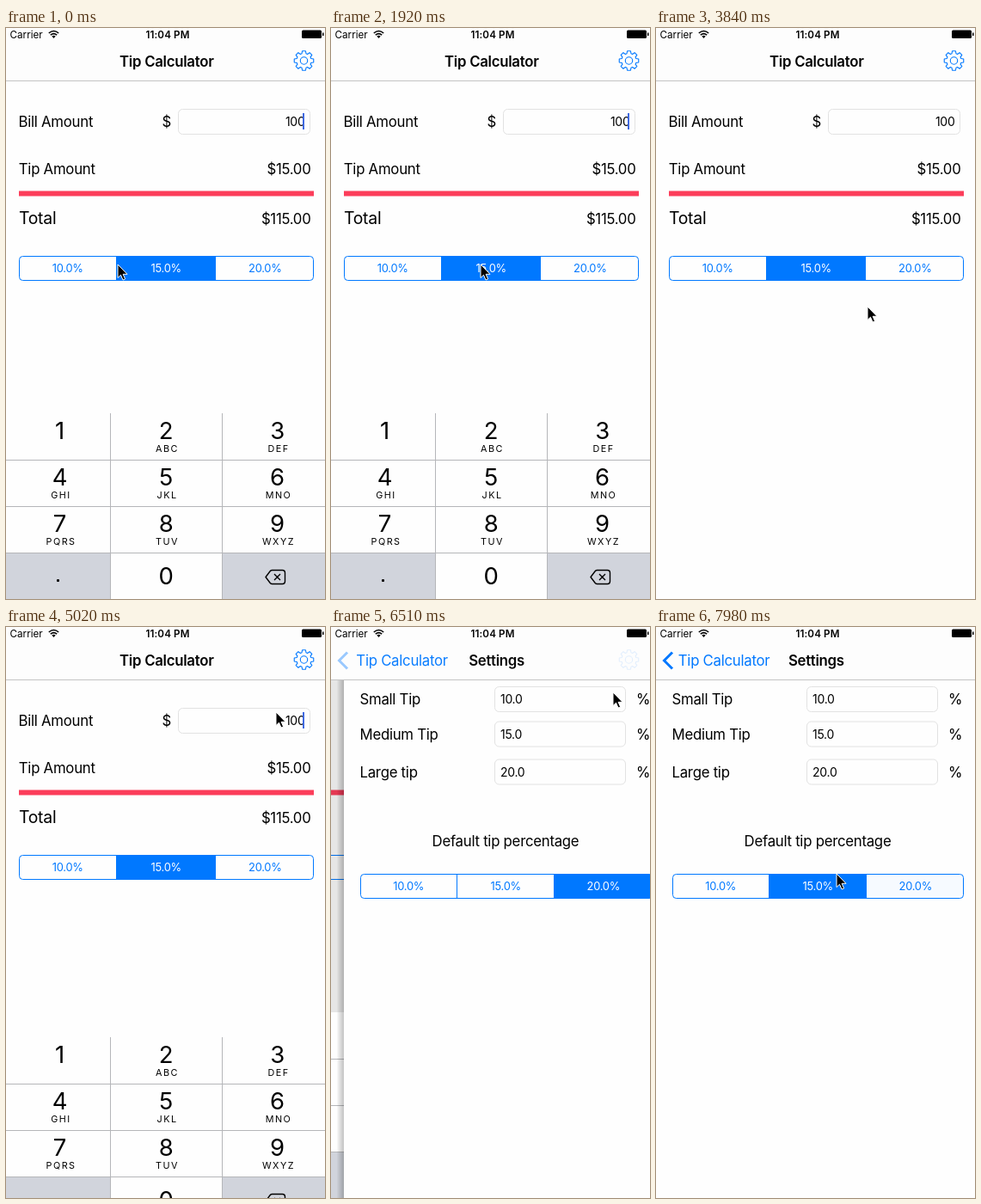
These frames come from a looping animation (371 by 664 pixels, 8000 ms). An HTML page:

```html
<!DOCTYPE html>
<html lang="en">
<head>
<meta charset="utf-8">
<title>Tip Calculator</title>
<style>
html, body { margin: 0; width: 100%; height: 100%; overflow: hidden; background: #fefefe; }
svg { display: block; width: 371px; height: 664px; font: 16.8px Inter, sans-serif; letter-spacing: -.016em; }
</style>
</head>
<body>
<svg id="stage" viewBox="0 0 371 664"></svg>
<script>
const BLUE = '#0078ff', STEP = 147.8, LOOP = 8000, LAST = 54;
const stage = document.getElementById('stage');

// Tracks: [step, value...]
const pointer = [[0, 130, 275], [4, 82, 282], [8, 86, 287], [13, 174, 275], [16, 215, 356], [18, 215, 356],
  [26, 246, 324], [32, 312, 104], [34, 314, 99], [39, 345, 38], [41, 346, 36], [42, 346, 36],
  [44, 328, 76], [50, 210, 287]];
const keyboardDrop = [[19, 0], [20, 60], [21, 165], [22, 216], [32, 216], [33, 120], [34, 29], [35, 2], [36, 0]];
const pushLeft = [[42, 1], [43, .4], [44, .0404], [45, 0]];

function at(track, n) {
  if (n <= track[0][0]) return track[0].slice(1);
  const i = track.findIndex(k => k[0] >= n);
  if (i < 0) return track[track.length - 1].slice(1);
  const a = track[i - 1], b = track[i], p = (n - a[0]) / (b[0] - a[0]);
  return a.slice(1).map((v, j) => v + (b[j + 1] - v) * p);
}

const text = (s, x, y, attrs = '') => `<text x="${x}" y="${y}" ${attrs}>${s}</text>`;
const rect = (x, y, w, h, fill, attrs = '') =>
  `<rect x="${x}" y="${y}" width="${w}" height="${h}" fill="${fill}" ${attrs}/>`;
const group = (x, y, body, attrs = '') => `<g transform="translate(${x} ${y})" ${attrs}>${body}</g>`;
const line = (d, color, width, attrs = '') =>
  `<path d="${d}" fill="none" stroke="${color}" stroke-width="${width}" ${attrs}/>`;
const field = (x, y, w, h) => rect(x + .5, y + .5, w - 1, h - 1, '#fefefe', 'rx="5" stroke="#e2e2e2"');
const MID = 'text-anchor="middle"', END = 'text-anchor="end"';

// edges: the four vertical borders; tint: optional [cell, colour]
function segments(edges, y, selected, tint) {
  const [l, a, b, r] = edges, h = 29;
  const cell = (i, fill) => {
    const x = edges[i], X = edges[i + 1], p = i == 0 ? 4 : 0, q = i == 2 ? 4 : 0;
    return `<path fill="${fill}" d="M${x + p} ${y}H${X - q}q${q} 0 ${q} ${q}V${y + h - q}q0 ${q} ${-q} ${q}` +
      `H${x + p}q${-p} 0 ${-p} ${-p}V${y + p}q0 ${-p} ${p} ${-p}z"/>`;
  };
  return (tint ? cell(...tint) : '') + cell(selected, BLUE) +
    rect(l + .5, y + .5, r - l - 1, h - 1, 'none', `rx="4" stroke="${BLUE}"`) +
    line(`M${a + .5} ${y}v${h}M${b - .5} ${y}v${h}`, BLUE, 1) +
    ['10.0%', '15.0%', '20.0%'].map((s, i) => text(s, (edges[i] + edges[i + 1]) / 2 + .3, y + 19,
      `${MID} font-size="12.9" fill="${i == selected ? '#fff' : BLUE}"`)).join('');
}

function calculator(n, caret) {
  const low = n >= 5 && n < 13;
  const tint = n == 4 ? [0, '#d5e9ff'] : n == 12 ? [1, '#d5e9ff'] : null;
  return rect(0, 62, 371, 602, '#fefefe') +
    text('Bill Amount', 14.5, 115) + text('$', 181.5, 115) + field(200, 94, 154, 30) +
    text('100', 347.5, 114, END + ' font-size="14"') +
    (caret ? rect(345, 99, 2, 19, '#3f68e0') : '') +
    text('Tip Amount', 14.8, 170) + text(low ? '$10.00' : '$15.00', 354.5, 170, END) +
    rect(15, 189.5, 343, 6, '#fc3d5a') +
    text('Total', 15, 227.5, 'font-size="19.4"') + text(low ? '$110.00' : '$115.00', 354.5, 227.5, END) +
    segments([15, 128, 244, 358], 265, low ? 0 : 1, tint);
}

const letters = ['', 'ABC', 'DEF', 'GHI', 'JKL', 'MNO', 'PQRS', 'TUV', 'WXYZ'];
const keyboard = rect(0, 0, 371, 216, '#fefefe') +
  rect(0, 163, 121, 53, '#d1d4dc') + rect(252, 163, 119, 53, '#d1d4dc') +
  line('M0 54.5H371M0 108.5H371M0 162.5H371M121.5 0V216M251.5 0V216', '#b5b6b9', 1) +
  letters.map((s, i) => {
    const x = [62.5, 186, 315.5][i % 3], y = 30 + 54 * (i / 3 | 0);
    return text(i + 1, x, y, MID + ' font-size="27.5"') +
      text(s, x + 1.5, y + 15, MID + ' font-size="10.8" letter-spacing="1.5"');
  }).join('') +
  text('0', 186, 199, MID + ' font-size="27.5"') + rect(59, 193, 3, 3, '#000', 'rx="1"') +
  line('M309.5 182.5H321.5q3 0 3 3V195.5q0 3 -3 3H309.5q-1.3 0 -2.2 -1L302 190.5L307.3 183.5q.9 -1 2.2 -1z' +
    'M312 187l7 7M319 187l-7 7', '#000', 1.4, 'stroke-linejoin="round"');

function settings(n) {
  const rows = [['Small Tip', '10.0', 69], ['Medium Tip', '15.0', 109.5], ['Large tip', '20.0', 153.5]];
  const tint = n == 53 ? [1, '#d5e9ff'] : n == 54 ? [2, '#f6faff'] : null;
  return rect(0, 62, 371, 602, '#fefefe') +
    rows.map(([name, value, y]) => text(name, 18.5, y + 21) + field(175, y, 153, 30) +
      text(value, 182, y + 20, 'font-size="14"') + text('%', 340, y + 21)).join('') +
    text('Default tip percentage', 188, 254.5, MID) +
    segments([19, 131, 245, 358], 287, n < 54 ? 2 : 1, tint);
}

const status = text('Carrier', 4.5, 11.5, 'font-size="11.7" letter-spacing="0"') +
  text('11:04 PM', 188, 11.5, MID + ' font-size="11.6" font-weight="600" letter-spacing=".15"') +
  line('M49.8 6q5.7 -5 11.4 0M51.8 8.2q3.7 -3.2 7.4 0', '#000', 1.6) +
  '<path d="M53.3 9.6q2.2 -1.7 4.4 0L55.5 12z"/>' +
  rect(344, 2.5, 23, 9.5, '#000', 'rx="1.5"') + rect(368, 5.5, 1.5, 3.5, '#000');

function gearPath() {
  const pts = [];
  for (let i = 0; i < 8; i++)
    for (const [da, r] of [[-.29, 8.6], [-.17, 11.4], [.17, 11.4], [.29, 8.6]]) {
      const a = i * Math.PI / 4 + da;
      pts.push((r * Math.cos(a)).toFixed(2) + ' ' + (r * Math.sin(a)).toFixed(2));
    }
  return 'M' + pts.join('L') + 'z';
}
const gear = line(gearPath(), BLUE, 1.1, 'stroke-linejoin="round"') +
  `<circle r="4.2" fill="none" stroke="${BLUE}" stroke-width="1.1"/>`;

function header(n, left) {
  const gearAlpha = n < 40 ? 1 : n < 43 ? .2 : left ? .1 : 0;
  const fade = a => `opacity="${Math.max(0, a)}"`;
  return rect(0, 0, 371, 61, '#fdfdfd') + rect(0, 61, 371, 1, '#c4c4c4') + status +
    text('Tip Calculator', 186.8 - 105 * (1 - left), 45, `${MID} font-weight="600" ${fade(left < .1 ? 0 : left)}`) +
    (left < 1 ? text('Settings', 186.3 + 155 * left, 45, `${MID} font-weight="600" ${fade(1 - left)}`) +
      text('Tip Calculator', 25.8 + 87 * left, 45, `fill="${BLUE}" ${fade(1 - left)}`) +
      line('M19 29.5L9.5 39L19 48.5', BLUE, 3, fade(1 - 15 * left)) : '') +
    group(346.5, 38, gear, fade(gearAlpha));
}

const arrow = '<path d="M0 0V15.5L3.5 12.2L6 18L8.6 16.9L6.1 11.3H11z" stroke="#fff" stroke-width="1"/>';

function scene(n) {
  const [left] = at(pushLeft, n), [drop] = at(keyboardDrop, n), [x, y] = at(pointer, n);
  const blink = n * STEP % 1000;
  const caret = (n < 20 || n > 32) && (blink < 400 || blink >= 800);
  const gone = 371 * (1 - left), edge = 371 * left;
  let out = '';
  if (left) {
    out += group(-.3 * gone, 0, calculator(n, caret)) +
      rect(0, 62, 371, 602, '#000', `opacity="${.1 * (1 - left)}"`) +
      group(-gone, 448 + drop, keyboard);
  }
  if (left < 1) {
    // soft shadow along the incoming page
    if (left) for (let i = 1; i < 9; i++) out += rect(edge - i, 62, i, 602, '#000', 'opacity=".03"');
    out += group(edge, 0, settings(n));
  }
  return out + header(n, left) + group(x, y, arrow);
}

let shown = -1;
function tick() {
  const t = performance.now() % LOOP;
  const n = Math.min(LAST, Math.floor((t + 10) / STEP));
  if (n != shown) stage.innerHTML = scene(shown = n);
  requestAnimationFrame(tick);
}
tick();
</script>
</body>
</html>
```
